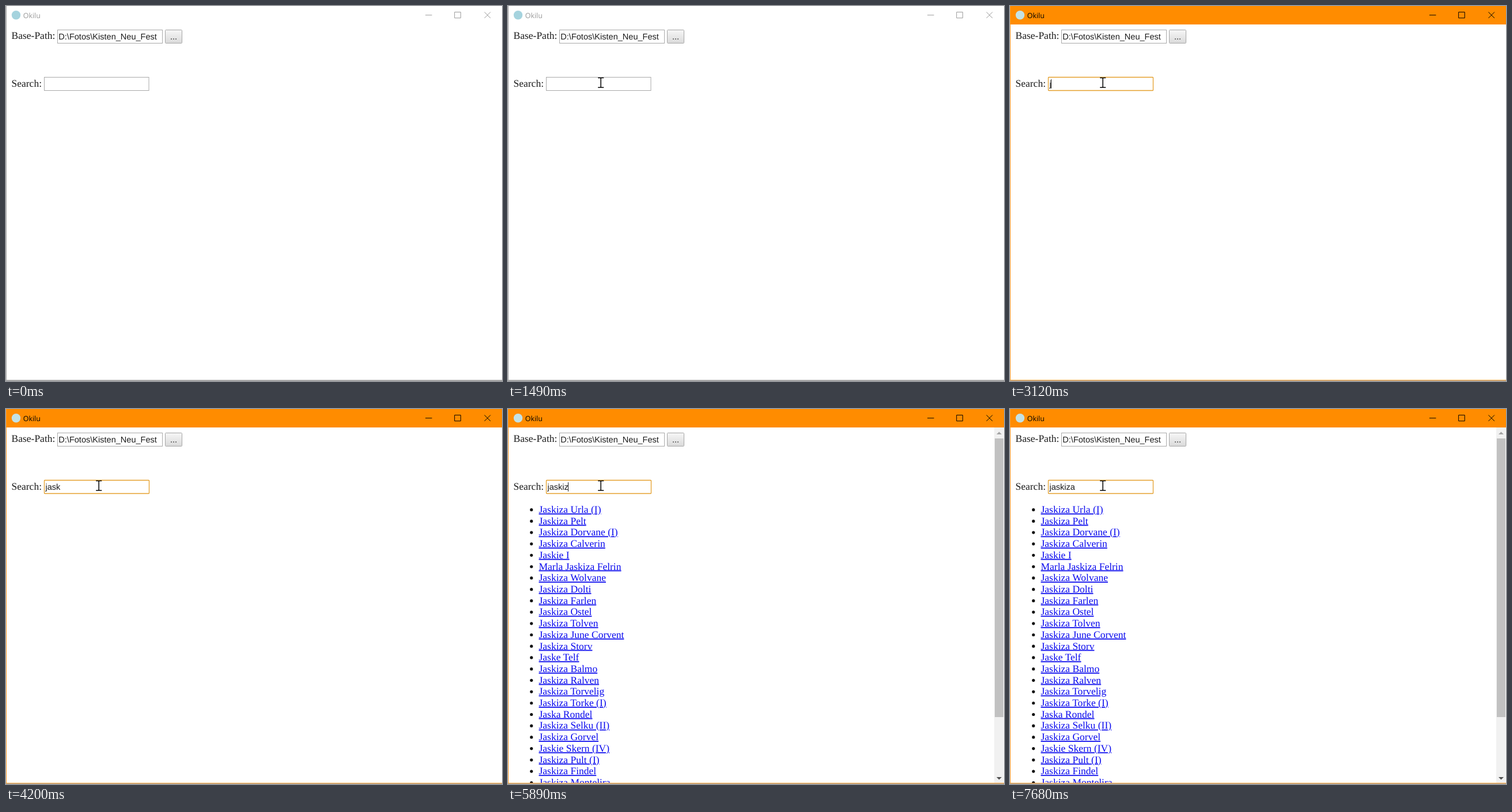
Recreate the animation shown at these times as an HTML page. Size 861 by 650 pixels, loop 8 s.

```html
<!DOCTYPE html>
<html lang="en">
<head>
<meta charset="utf-8">
<title>Search demo</title>
<style>
  html, body { margin: 0; width: 100%; height: 100%; overflow: hidden; background: #fff; }
  svg { display: block; width: 861px; height: 650px; }
  text { white-space: pre; text-rendering: geometricPrecision; fill: #1c1c1c; }
  .serif { font: 17.52px "Liberation Serif", "Times New Roman", serif; }
  .sans { font: 14.55px "Liberation Sans", Arial, sans-serif; }
  .title { font: 12.4px "Open Sans", "Noto Sans", sans-serif; fill: var(--ink); }
  .field { fill: #fff; stroke: #a9a9a9; }
  .link { fill: #0a0aee; text-decoration: underline 1.1px; }
  .frame { fill: var(--edge); }
  .controls { fill: none; stroke: var(--ink); }
  #typed { font-kerning: none; }
  #win { --bar: #fff; --edge: #a6a6a6; --ink: #999; --icon: #a5d3de; }
  #win.active { --bar: #ff8c00; --edge: #ff9d26; --ink: #000; --icon: #c4e2e5; }
  #focus { fill: #fff; stroke: #e5a02c; stroke-width: 1.3; visibility: hidden; }
  .active #focus { visibility: visible; }
</style>
</head>
<body>
<svg id="win" viewBox="0 0 861 650">
  <defs>
    <linearGradient id="face" x2="0" y2="1">
      <stop offset="0" stop-color="#f6f6f6"/>
      <stop offset="1" stop-color="#dadada"/>
    </linearGradient>
    <clipPath id="page"><rect x="1" y="32" width="859" height="616"/></clipPath>
  </defs>

  <rect width="861" height="650" fill="#fff"/>

  <text class="serif" x="9.5" y="57.2">Base-Path:</text>
  <rect class="field" x="89.5" y="41.5" width="182" height="23"/>
  <text class="sans" x="91.3" y="57.7">D:\Fotos\Kisten_Neu_Fest</text>
  <rect x="276.5" y="41.5" width="29" height="23" rx="1" fill="url(#face)" stroke="#a6a6a6"/>
  <text class="sans" x="291" y="57.7" text-anchor="middle">...</text>

  <text class="serif" x="9.5" y="139.5">Search:</text>
  <rect class="field" x="66.5" y="123.5" width="181.5" height="23"/>
  <rect id="focus" x="66.5" y="123.5" width="182" height="23" rx="1"/>

  <g id="results" clip-path="url(#page)">
    <g id="list"></g>
    <rect x="844" y="32" width="16" height="616" fill="#f1f1f1"/>
    <rect x="845" y="51" width="15" height="483" fill="#c1c1c1"/>
    <path d="M848 44 l4.5 -4.5 l4.5 4.5z" fill="#a3a3a3"/>
    <path d="M848 638 l4.5 4.5 l4.5 -4.5z" fill="#505050"/>
  </g>

  <rect width="861" height="32" fill="var(--bar)"/>
  <rect class="frame" width="1" height="649"/>
  <rect class="frame" y="648" width="861" height="1"/>
  <rect y="649" width="861" height="1" fill="#aaa"/>
  <circle cx="17.5" cy="15.7" r="7.7" fill="var(--icon)"/>
  <text class="title" x="29.8" y="21">Okilu</text>
  <g class="controls">
    <path d="M728 15.8h11.5M778.7 10.6h10.6v10.2h-10.6z"/>
    <path d="M830.5 10.5l10.5 10.5m0 -10.5l-10.5 10.5"/>
  </g>

  <circle id="click" cx="160" cy="133" r="9" fill="#ffff6c"/>
  <text id="typed" class="sans" x="68.45" y="140"></text>
  <rect id="caret" y="127" width="1" height="16" fill="#222"/>

  <g id="pointer">
    <path id="arrow" d="M.5 .5v16l3.7 -3.5l2.6 5.8l2.3 -1l-2.6 -5.7h5z" fill="#fff" stroke="#000"/>
    <path id="beam" d="M-4.8 -8.5h4l1 1l1 -1h4M-4.8 8.3h4l1 -1l1 1h4M.2 -8v16" fill="none" stroke="#000" stroke-width="1.5"/>
  </g>
</svg>
<script>
const LOOP = 8000;
const ROW = 19.71;
const WORD = "jaskiza";
const KEYS = [3120, 3180, 3570, 3740, 4900, 5890, 6220];
const CARET_ON = [1620, 2650, 4730, ...KEYS];
const CARET_OFF = [2190, 4200, 5360, 6690, 7680];
// The caret also comes back on the last blink before the loop ends.
CARET_ON.push(7220);
// "*" stands for the shared first name.
const NAMES = `* Urla (I)|* Pelt|* Dorvane (I)|* Calverin|Jaskie I|Marla * Felrin|* Wolvane|* Dolti|* Farlen|
* Ostel|* Tolven|* June Corvent|* Storv|Jaske Telf|* Balmo|* Ralven|* Torvelig|* Torke (I)|Jaska Rondel|
* Selku (II)|* Gorvel|Jaskie Skern (IV)|* Pult (I)|* Findel|* Montelira`.replace(/\n/g, "").split("|");

const $ = id => document.getElementById(id);
const show = (el, on) => el.setAttribute("visibility", on ? "inherit" : "hidden");
const mix = (a, b, p) => a.map((v, i) => v + (b[i] - v) * p);
const passed = (times, t) => times.filter(v => v <= t);
const latest = (times, t) => Math.max(-1, ...passed(times, t));
const stepped = (t, from, to, steps) =>
  Math.min(1, Math.max(0, Math.floor((t - from) / (to - from) * steps + 1e-6) / steps));

$("list").innerHTML = NAMES.map((name, i) => {
  const y = 180 + i * ROW;
  return `<circle cx="40.7" cy="${y - 5.3}" r="2.6" fill="#111"/>` +
    `<text class="serif link" x="53.5" y="${y}">${name.replace("*", "Jaskiza")}</text>`;
}).join("");

function pointerAt(t) {
  if (t < 1260) {
    const p = stepped(t, 560, 1100, 7);
    return mix([502, 489], [157, 127], (1 - Math.cos(Math.PI * p)) / 2);
  }
  return mix([158, 129], [161, 133], stepped(t, 1260, 1490, 3));
}

function draw(t) {
  $("win").classList.toggle("active", t >= 1620);
  show($("results"), t >= 5890);
  show($("click"), t >= 1620 && t < 1730);

  const [x, y] = pointerAt(t);
  const overField = x > 66 && x < 249 && y > 123 && y < 147;
  $("pointer").setAttribute("transform", `translate(${Math.round(x)} ${Math.round(y)})`);
  show($("pointer"), t >= 560);
  show($("arrow"), !overField);
  show($("beam"), overField);

  const typed = WORD.slice(0, passed(KEYS, t).length);
  if ($("typed").textContent !== typed) $("typed").textContent = typed;
  const end = typed ? 68.45 + $("typed").getComputedTextLength() : 69;
  $("caret").setAttribute("x", Math.floor(end));
  show($("caret"), latest(CARET_ON, t) > latest(CARET_OFF, t));
}

const start = performance.now();
function tick() {
  draw((performance.now() - start) % LOOP);
  requestAnimationFrame(tick);
}
tick();
</script>
</body>
</html>
```
